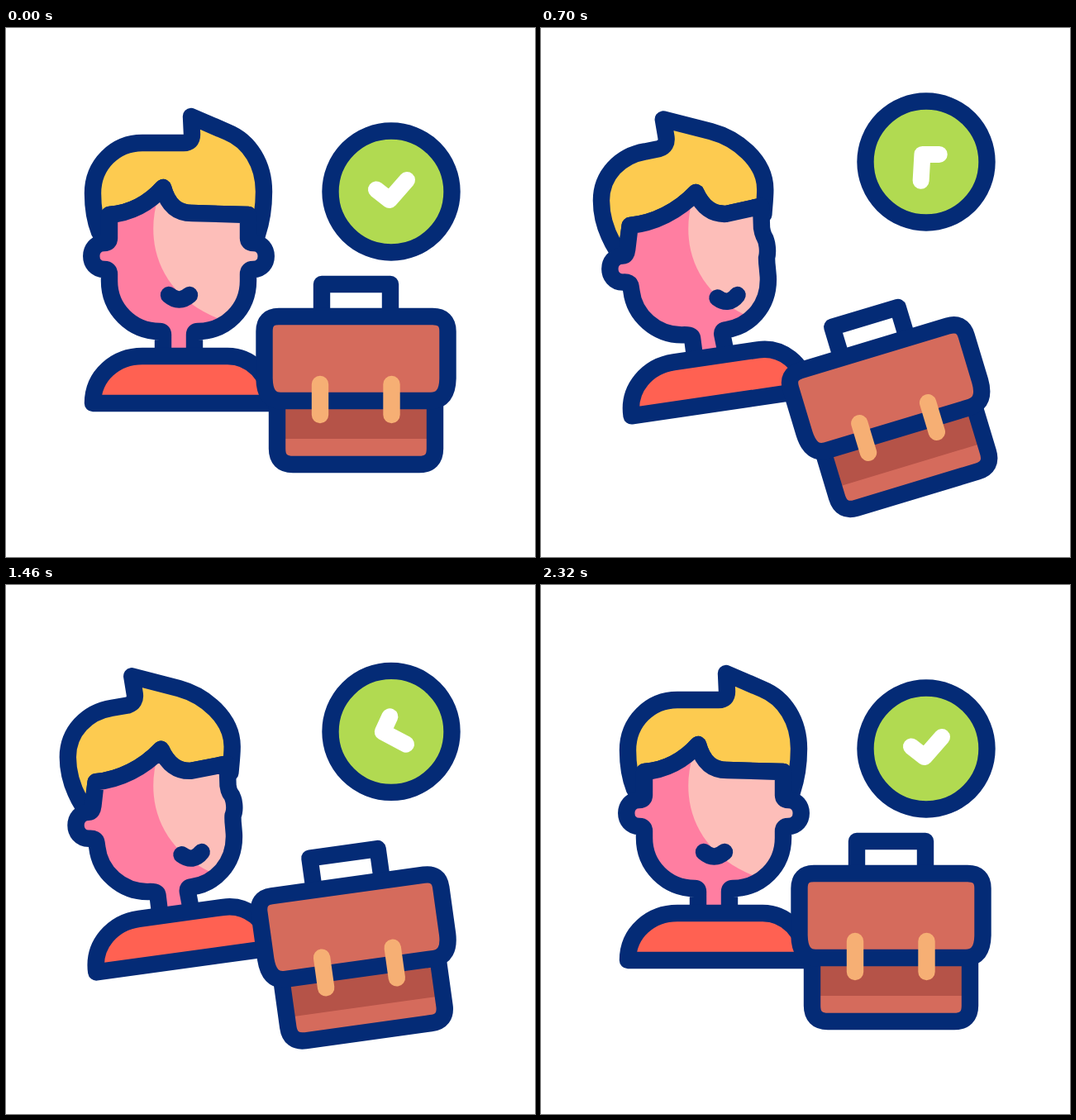
An HTML page that plays this animation: 640x640 px, repeating every 2.4 s.

```html
<!DOCTYPE html>
<html lang="en">
<head>
<meta charset="utf-8">
<title>Worker, briefcase and check mark</title>
<style>
  html, body { margin: 0; height: 100%; overflow: hidden; background: #fff; }
  svg { display: block; width: 100%; height: 100%; }
  .line { stroke: #042b76; stroke-width: 20.4; stroke-linecap: round; stroke-linejoin: round; }
</style>
</head>
<body>
<svg viewBox="0 0 640 640" fill="none">
  <clipPath id="faceClip"><path id="faceShape"/></clipPath>
  <path id="hair" class="line" fill="#fdcb50"/>
  <path id="faceFill" fill="#ff7ea1"/>
  <path clip-path="url(#faceClip)" fill="#fdbeb9" d="M184 205C166 265 190 325 258 352H330V190H184Z"/>
  <path id="faceLine" class="line"/>
  <path id="mouth" class="line"/>
  <path id="body" class="line" fill="#ff6152"
    d="M105 454C105 420 133 397 165 397H268C297 397 319 420 322 454Z"/>
  <g id="briefcase">
    <path class="line" d="M382 349V310H465V349"/>
    <path fill="#d56b5c" d="M328 452H519V528H328Z"/>
    <path fill="#b55348" d="M328 452H519V497H328Z"/>
    <path class="line" d="M328 452V509Q328 528 347 528H500Q519 528 519 509V452"/>
    <path class="line" fill="#d56b5c"
      d="M330 349H516Q534.5 349 534.5 367V424Q534 451 514 451H332Q313 451 312.5 424V367Q312.5 349 330 349Z"/>
    <path stroke="#f6af74" stroke-width="20.4" stroke-linecap="round" d="M380 431V468M466.500 431V468"/>
  </g>
  <g id="badge">
    <circle class="line" cx="466" cy="198" r="73.500" fill="#b1da51"/>
    <path id="check" stroke="#fff" stroke-width="20" stroke-linecap="round" stroke-linejoin="round"
      d="M448 195.500L464 208L485 184"/>
  </g>
</svg>
<script>
const LOOP = 2400, TURN = 1062;
const el = id => document.getElementById(id);

// Each shape has a front pose and a turned pose with the same commands.
const hair = [
  `M113 247C107 232 105 215 105 200C105 165 132 139 165 139L215 139Q225 139 225 129L224 107
   L268 126C295 137 312 165 312 198C312 215 310 232 304 250L293 226L225 224
   C208 224 196 215 190 193C172 213 150 224 125 226L124 244Z`,
  `M89 273C77 255 68 232 68 210C68 180 90 157 120 151L132 147Q142 143 140 132L136 111
   L196 125C228 133 265 160 265 195C265 203 264 212 264 222L262 214L224 225
   C208 226 196 218 187 200C165 223 135 238 105 241L101 268Z`
];
const face = [
  `M125 226L125 254Q125 260 119 260C98 260 98 292 119 292Q125 292 125 298L125 306
   C125 340 152 367 186 367Q190 367 190 371L190 402L228 402L228 371Q228 367 232 367
   C266 367 293 340 293 306L293 298Q293 292 299 292C320 292 320 260 299 260
   Q293 260 293 254L293 226L225 224C208 224 196 215 190 193C172 213 150 224 125 226Z`,
  `M105 241L101 270Q100 278 96 278C75 278 75 310 96 310Q105 309 106 315L107 320
   C111 349 137 372 168 372Q181 371 182 376L186 402L224 396L218 371Q217 366 222 365
   C248 361 274 338 272 300L271 290Q270 283 269 276C268 268 267 258 265 250
   Q264 246 263 240L262 214L224 225C208 226 196 218 187 200C165 223 135 238 105 241Z`
];
const mouth = ['M197 323Q209.5 334 222 323', 'M216 327Q230 337 240 323'];

// Keys are [time in ms, value].
const caseY = [[0, 0], [217, -15], [590, 59], [930, -36], [1265, 53], [1640, -20.5], [2030, 15], [2320, 0]];
const caseAngle = [[0, 0], [710, -16.8], [1080, 17], [1515, -9], [1830, 4.6], [2320, 0]];
const badgeY = [[0, 0], [433, 36], [700, -36], [1060, 34], [1440, -21], [1780, 15.4], [2133, 0]];
const checkAngle = [[330, 0], [980, -360], [1055, -360], [1650, -732], [1980, -720]];

function track(keys, t) {
  const i = keys.findIndex(key => key[0] > t);
  if (i < 0) return keys[keys.length - 1][1];
  if (i === 0) return keys[0][1];
  const [t0, v0] = keys[i - 1], [t1, v1] = keys[i];
  const u = (t - t0) / (t1 - t0);
  return v0 + (v1 - v0) * u * u * (3 - 2 * u);
}

// cubic-bezier(.68, 0, .32, 1)
function ease(x) {
  let lo = 0, hi = 1;
  for (let i = 0; i < 24; i++) {
    const u = (lo + hi) / 2, v = 1 - u;
    if (3 * v * v * u * .68 + 3 * v * u * u * .32 + u ** 3 < x) lo = u; else hi = u;
  }
  return lo * lo * (3 - 2 * lo);
}

function morph([from, to], p) {
  const ends = to.match(/[\d.]+/g);
  let i = 0;
  return from.replace(/[\d.]+/g, n => (+n + (ends[i++] - n) * p).toFixed(2));
}

function draw(now) {
  const t = now % LOOP;
  const p = ease(Math.max(0, 1 - Math.abs(t / TURN - 1))) * 1.015;

  const faceD = morph(face, p);
  for (const id of ['faceShape', 'faceFill', 'faceLine']) el(id).setAttribute('d', faceD);
  el('hair').setAttribute('d', morph(hair, p));
  el('mouth').setAttribute('d', morph(mouth, p));

  const move = (id, value) => el(id).setAttribute('transform', value);
  move('body', `translate(${-5.5 * p} ${p}) rotate(${-9.6 * p} 209 397)`);
  move('briefcase', `translate(0 ${track(caseY, t)}) rotate(${track(caseAngle, t)} 423.5 419)`);
  move('badge', `translate(0 ${track(badgeY, t)})`);
  move('check', `rotate(${track(checkAngle, t)} 466 198)`);
}

const start = performance.now();
function loop() {
  draw(performance.now() - start);
  requestAnimationFrame(loop);
}
loop();
</script>
</body>
</html>
```
